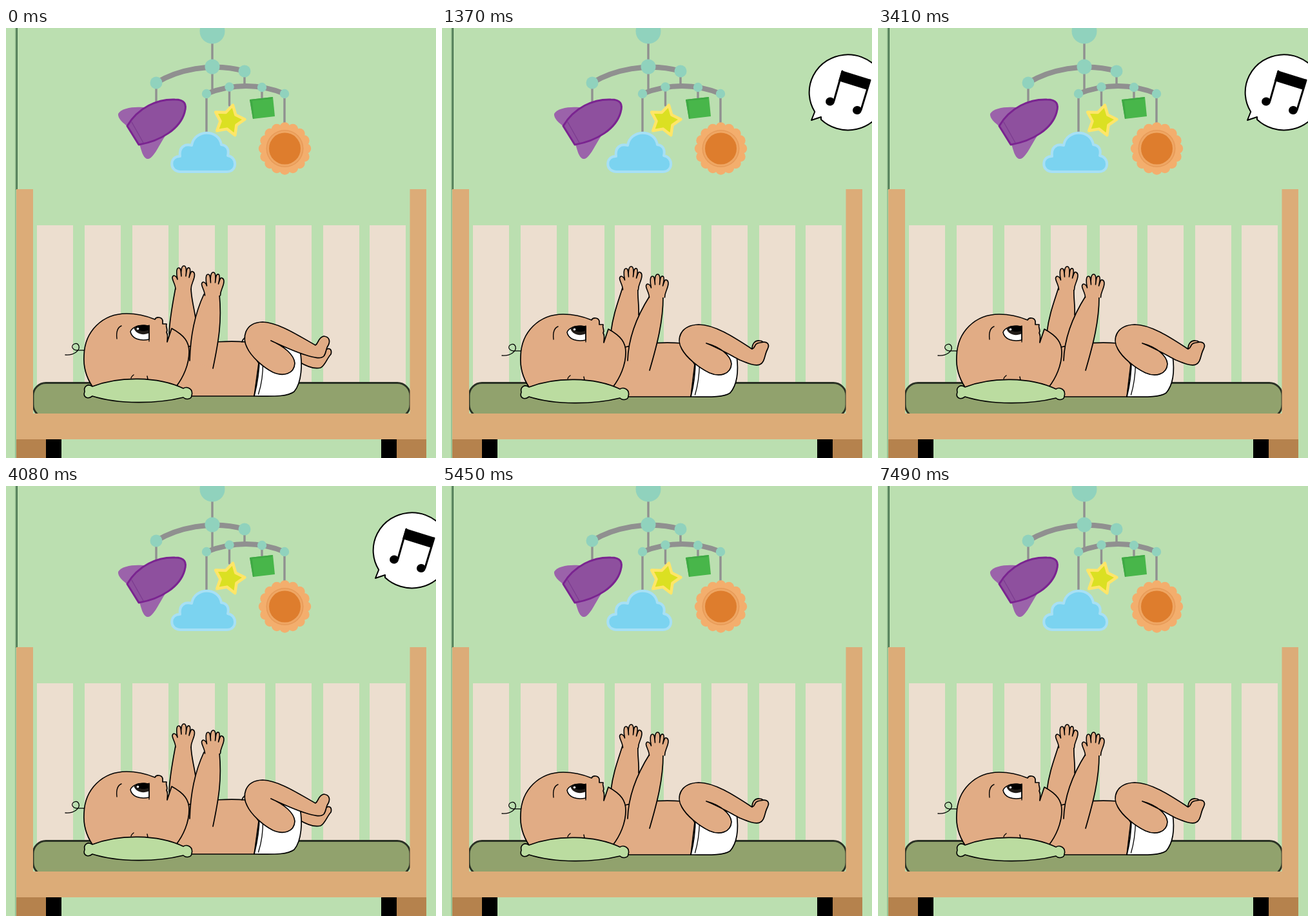
Write an HTML page with a canvas that moves like this. It is 667x667 px and loops after 8000 ms.

```html
<!DOCTYPE html>
<html lang="en">
<head>
<meta charset="utf-8">
<title>Baby in a crib</title>
<style>
html, body { margin: 0; width: 100%; height: 100%; overflow: hidden; background: #bbdfb0; }
canvas { display: block; width: 100vw; height: 100vh; }
</style>
</head>
<body>
<canvas id="stage" width="667" height="667"></canvas>
<script>
const ctx = document.getElementById('stage').getContext('2d');
const LOOP = 8000;
const SKIN = '#e1ac85', WOOD = '#dcac78', MINT = '#90d2bd', GREY = '#909090', INK = '#000';

function shape(d, fill, stroke, width = 1.7) {
  const p = new Path2D(d);
  if (fill) { ctx.fillStyle = fill; ctx.fill(p); }
  if (stroke) { ctx.strokeStyle = stroke; ctx.lineWidth = width; ctx.stroke(p); }
}
function rect(x, y, w, h, color) {
  ctx.fillStyle = color;
  ctx.fillRect(x, y, w, h);
}
function oval(x, y, rx, ry, fill, turn = 0) {
  ctx.beginPath();
  ctx.ellipse(x, y, rx, ry, turn, 0, Math.PI * 2);
  ctx.fillStyle = fill;
  ctx.fill();
}
const dot = (x, y, r, fill) => oval(x, y, r, r, fill);

function moved([x, y], draw) {
  ctx.save();
  ctx.translate(x, y);
  draw();
  ctx.restore();
}

function room() {
  rect(0, 0, 667, 667, '#bbdfb0');
  rect(14, 0, 1.5, 667, '#8fb98c');
  rect(15.5, 0, 2.5, 251, '#4c7853');
  for (const [x, w] of [[48, 56], [122, 56], [196, 56], [268, 56], [344, 58], [418, 56], [492, 56], [564, 56]])
    rect(x, 306, w, 250, '#ecdecf');
  shape('M62 550.500H607A20 20 0 0 1 627 570.500V584A20 20 0 0 1 607 604H62A20 20 0 0 1 42 584V570.500A20 20 0 0 1 62 550.500Z',
    '#91a26d', '#2a3124', 2.8);
  rect(16, 250, 26, 388, WOOD);
  rect(626.5, 250, 25.5, 388, WOOD);
  rect(16, 598, 636, 40, WOOD);
  rect(16, 638, 46, 29, '#b5824d');
  rect(606, 638, 46, 29, '#b5824d');
  rect(62, 638, 24, 29, INK);
  rect(582, 638, 24, 29, INK);
}

function star(x, y, r, inner, turn) {
  ctx.beginPath();
  for (let i = 0; i < 10; i++) {
    const a = turn + i * Math.PI / 5, k = i % 2 ? inner : r;
    ctx.lineTo(x + k * Math.cos(a), y + k * Math.sin(a));
  }
  ctx.closePath();
  ctx.fillStyle = '#dbe022';
  ctx.strokeStyle = '#ffe668';
  ctx.lineWidth = 4.5;
  ctx.fill();
  ctx.stroke();
}

function sun(x, y) {
  for (let i = 0; i < 16; i++) {
    const a = i * Math.PI / 8 + Math.PI / 2;
    dot(x + 32.5 * Math.cos(a), y + 32.5 * Math.sin(a), 8.2, '#f3ae6d');
  }
  dot(x, y, 34, '#f3ae6d');
  dot(x, y, 29, '#e79a58');
  dot(x, y, 27.5, '#efa663');
  dot(x, y, 24.5, '#de7d2d');
}

function mobile() {
  shape('M320 20V95M233 85V114M370 67V90M311 102V164M346.500 92V120M397 92V110M432 102V150', null, GREY, 3.4);
  shape('M233 85C264 66 318 52 370 67M311 102C350 87 390 85 432 102', null, GREY, 8);
  dot(320, 5, 19.5, MINT);
  dot(320, 60, 11.5, MINT);
  dot(233, 85, 9.5, MINT);
  dot(370, 67, 9.5, MINT);
  for (const [x, y] of [[311, 102], [346.5, 91.5], [397, 92], [432, 102]]) dot(x, y, 7.2, MINT);

  shape('M174 133C180 123 203 121 220 124L189 153C181 147 173 140 174 133Z', '#9b63aa');
  shape('M207 180C210 190 213 204 221 203C230 201 238 180 248 166Z', '#9b63aa');
  shape('M188 152C205 123 235 110 262 111C277 111 281 118 277 131C270 156 241 175 206 181Z', '#8e509e', '#7a2490', 3);
  shape('M195 146L213 178', null, '#7c3c90', 1.3);

  shape('M270 223C252 222 254 198 270 199C268 185 277 179 288 182C292 157 330 156 334 181C344 182 346 190 344 198C358 200 360 222 343 223Z', '#7bd3f0', '#a7e0f5', 4);
  star(346, 143.5, 24.5, 13.5, -1.33);
  shape('M378 111L414 107L417 137L383 141Z', '#48b64a');
  shape('M378 111L414 107L412 110L382 113L385 140L383 141Z', '#3fa944');
  sun(432.5, 187);
}

function bubble() {
  shape('M578.200 130A60 58.500 0 1 1 588 142L588 138L573 143Z', '#fff', INK, 2);
  shape('M621 67L608 113M664 81L650 127', null, INK, 3);
  shape('M620 66L665 80L660 96L615 82Z', INK);
  oval(602, 114, 7, 6.5, INK, -.3);
  oval(644, 127.5, 7, 6.5, INK, -.3);
}

const HAND = 'M-12 1C-12 -6 -17 -12 -17 -17C-16 -22 -11 -20 -9 -14' +
  'C-11 -23 -11 -32 -7 -32C-3 -32 -4 -25 -3 -19C-4 -27 -3 -35 1 -35C5 -35 5 -27 4 -19' +
  'C5 -26 5 -33 9 -32C12 -31 11 -25 9 -17C11 -23 12 -28 15 -26C19 -24 17 -16 15 -11C13 -6 12 -4 12 1';

// The whole limb is filled, but its last straight edge (the shoulder) has no outline.
function arm(d, wrist) {
  const cut = d.lastIndexOf('L');
  shape(d, SKIN);
  shape(d.slice(0, cut) + 'M' + d.slice(cut + 1), null, INK);
  moved(wrist, () => shape(HAND, SKIN, INK, 1.6));
}

function head() {
  shape('M92 507C106 508 115 500 113 493C110 486 101 491 103 496C106 502 115 499 123 500', null, INK, 1.3);
  shape('M134 556C124 541 120 523 121 508C122 470 150 443 187 443C204 443 219 447 231 452' +
    'C233 447 243 448 243 455L243 459L249 459C247 464 252 468 249 472C252 477 250 482 250 487' +
    'L257 466C277 477 284 487 284 502C284 522 275 542 264 556', SKIN, INK);
  shape('M179 462C172 465 171 474 172 482M194 543Q195 540 198 538M219 540L220 545', null, INK, 1.4);
  shape('M193 471C196 463 208 460 222 462L222 483C208 486 195 482 193 471Z', '#fff', INK, 1.5);
  shape('M198 465C203 460 215 460 222 462L222 473C214 477 202 476 198 465Z', '#211c18');
  shape('M201 463C206 460 216 460 222 462V468C213 472 204 470 201 463Z', INK);
  dot(204.5, 466.5, 1.8, '#fff');
  shape('M222 461V486', null, INK, 1.3);
}

function pillow() {
  shape('M122 564C120 556 127 551 134 556C175 540 235 540 275 559C281 555 291 560 288 570' +
    'C288 576 279 577 275 573C235 583 175 584 134 571C126 577 119 572 122 564Z', '#bbdca0', INK, 1.6);
}

const poses = {
  wide: {
    head: [0, 0],
    farArm: 'M263 403C258 430 254 450 253 474L264 510L295 500L294 450C291 430 287 418 287 403',
    farHand: [275, 404],
    nearArm: 'M307 413C293 443 286 478 285 516L321 528C330 485 335 455 331 413',
    nearHand: [320.5, 414],
    torso: 'M284 494C310 486 350 485 372 487L392 520L385 571L262 571',
    hip: 'M366 487C367 482 370 481 372 479',
    farLeg: 'M455 518C468 526 480 529 488 527C495 524 498 512 504 506C506 499 502 496 498 498L455 500',
    nappy: 'M393 512C393 535 389 555 385 571C408 571 436 573 447 564C459 550 460 520 456 500L420 486Z',
    seam: 'M398.500 517Q399 545 391.500 568',
    leg: 'M411 485C432 494 447 507 448 520C447 537 430 541 414 534C398 526 380 509 374 496C366 482 369 457 398 456' +
      'C424 457 455 478 480 492C485 489 484 480 493 478C502 479 503 486 500 492C496 497 497 504 493 509C488 514 477 511 464 507C445 501 428 493 411 485'
  },
  apart: {
    head: [1, 1],
    farArm: 'M280 403C273 425 265 446 262 472L268 512L304 505L305 445C306 430 303 418 304 403',
    farHand: [292.5, 405],
    nearArm: 'M322 416C303 446 289 480 288 516L322 531C334 490 343 455 343 416',
    nearHand: [333.5, 417],
    torso: 'M284 495C310 488 350 487 372 489L392 522L386 572L262 572',
    farLeg: 'M470 510L481 498C481 489 486 484 493 485C497 485 499 488 499 492',
    nappy: 'M393 515C393 537 390 556 386 572C408 572 436 574 447 566C459 552 460 530 457 508L420 490Z',
    seam: 'M399.500 520Q399 547 392.500 569',
    leg: 'M410 489C432 495 448 508 449 521C448 537 431 542 415 535C398 527 379 511 372 498C363 483 369 461 398 460' +
      'C424 460 455 481 481 498C487 496 483 489 494 488C504 485 509 490 505 498C500 507 501 519 493 522C486 525 474 520 462 515C445 506 428 496 410 489'
  },
  close: {
    head: [2, -1],
    farArm: 'M276 401C268 425 263 446 261 472L270 510L299 500L299 460C300 440 300 420 300 403',
    farHand: [288.5, 403],
    nearArm: 'M302 408C290 445 285 480 285 517L323 526C328 490 328 455 324 408',
    nearHand: [313, 411],
    torso: 'M285 492C310 485 350 482 371 485L394 520L388 570L262 570',
    farLeg: 'M452 515C466 521 480 528 488 526C496 522 500 513 505 507C509 500 504 496 500 498L455 498',
    nappy: 'M395 512C395 535 392 555 388 570C408 570 430 572 441 564C454 550 455 525 451 503L420 487Z',
    seam: 'M400.500 518Q401 545 394.500 566',
    leg: 'M410 486C432 493 449 506 451 519C449 536 432 540 416 533C398 525 380 510 373 496C364 481 372 459 401 458' +
      'C426 459 455 477 480 489C486 486 486 477 496 476C505 477 507 484 503 490C498 495 497 504 492 508C486 511 476 508 464 504C445 498 428 491 410 486'
  }
};

function baby(p) {
  arm(p.farArm, p.farHand);
  shape(p.torso, SKIN, INK);
  if (p.hip) shape(p.hip, null, INK);
  shape(p.farLeg, SKIN, INK);
  shape(p.nappy, '#fff', INK);
  shape(p.seam, null, INK, 1.3);
  shape(p.leg, SKIN, INK);
  moved(p.head, head);
  arm(p.nearArm, p.nearHand);
  moved(p.head, pillow);
}

const order = ['wide', 'close', 'apart'];
const cuts = [670, 1370, 2040, 2710, 3410, 4080, 4750, 5450, 6120, 6790, 7490];

function render(t) {
  room();
  mobile();
  baby(poses[order[cuts.filter(c => t >= c).length % 3]]);
  if (t >= 1370 && t < 4450) bubble();
}

ctx.lineJoin = ctx.lineCap = 'round';
const start = performance.now();
function tick() {
  render((performance.now() - start) % LOOP);
  requestAnimationFrame(tick);
}
tick();
</script>
</body>
</html>
```
